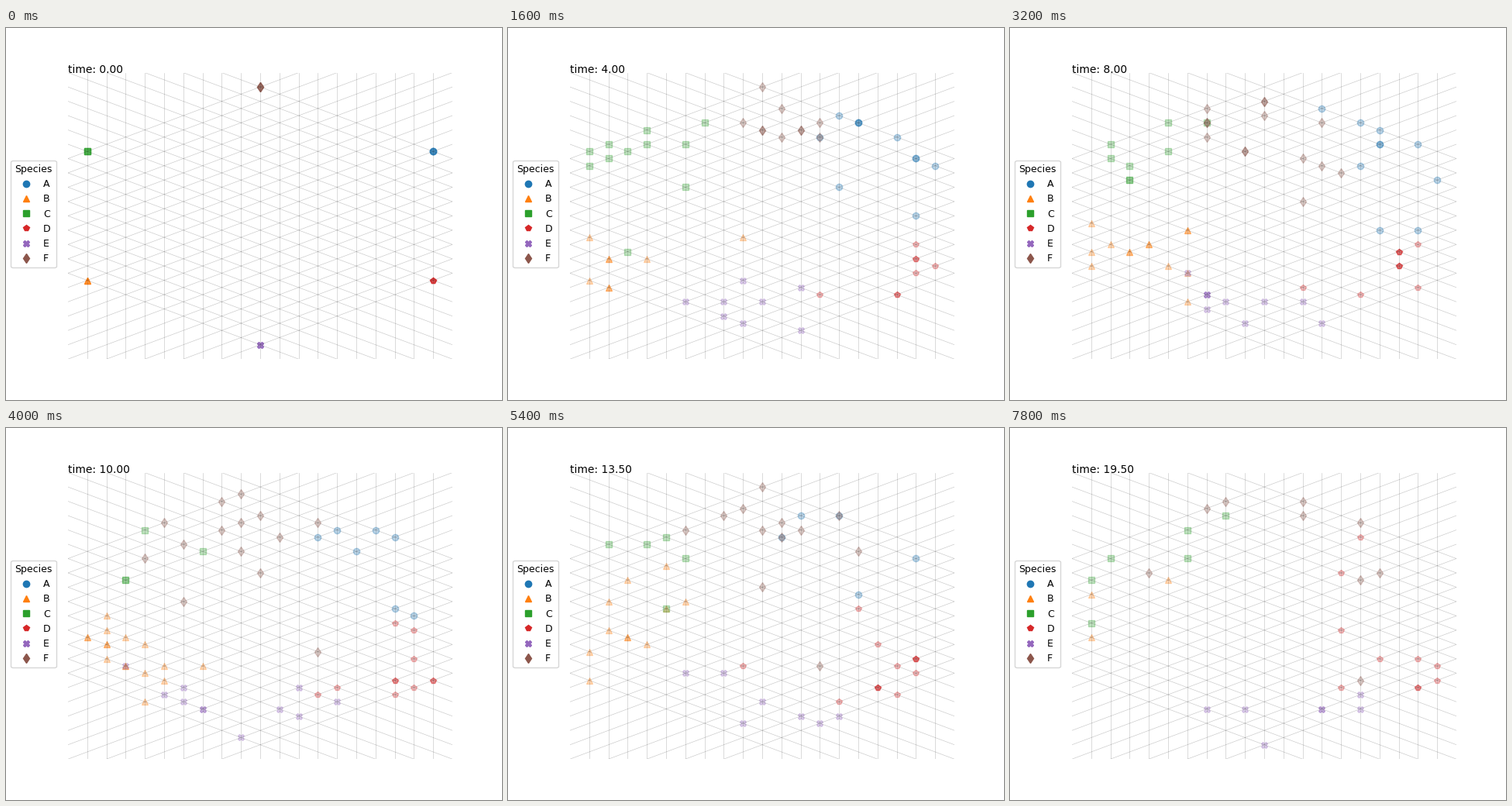
These frames come from a looping animation (640x480 px, 8 s). A matplotlib script:

```python
import numpy as np
import matplotlib.pyplot as plt
from matplotlib.animation import FuncAnimation
from matplotlib.lines import Line2D

FRAMES, INTERVAL = 40, 200
RADIUS = 9
HOPS = 1.5  # mean hops of one particle per frame
STEPS = np.array([(0, 1), (0, -1), (1, .5), (1, -.5), (-1, .5), (-1, -.5)])

MARKERS = dict(A="o", B="^", C="s", D="p", E="X", F="d")
COLORS = {name: f"C{k}" for k, name in enumerate(MARKERS)}

# Population and centre (x, y) of each species at the key frames
KEYS = [0, 5, 12, 20, 27, 33, 39]
CLOUDS = dict(
    A=[(5, 9, 4.5), (9, 6.9, 5.1), (14, 6.9, 5), (7, 4.9, 5),
       (5, 4.8, 5.4), (2, 5, 4.5), (0, 5, 4.5)],
    B=[(5, -9, -4.5), (6, -8, -4.3), (10, -6.7, -3.1), (16, -7, -2.5),
       (11, -7.1, -1), (7, -8, .3), (3, -8, 0)],
    C=[(5, -9, 4.5), (11, -7.1, 4.6), (11, -6.5, 3.9), (4, -5, 4.8),
       (5, -6, 3.6), (3, -6.3, 5.2), (6, -5.7, 5.3)],
    D=[(5, 9, -4.5), (7, 8.1, -3.8), (10, 6.6, -4.1), (11, 7, -4.5),
       (13, 6, -3.8), (8, 6.4, -3), (10, 6.4, -2)],
    E=[(5, 0, -9), (8, -1, -7.1), (9, -1.3, -7), (11, -2.2, -6.1),
       (7, -.3, -6.7), (7, .1, -7.1), (7, 1.4, -6.9)],
    F=[(5, 0, 9), (7, 1, 7.3), (14, .4, 6.7), (14, -1.3, 4.6),
       (12, 1, 5.6), (13, .8, 5.4), (9, .7, 4.4)],
)


def inside(p):
    return abs(p[0]) <= RADIUS and abs(p[1]) + abs(p[0]) / 2 <= RADIUS


def hop(site, pull, rng):
    """Move to a neighbouring site, favouring the direction of pull."""
    near = [site + s for s in STEPS if inside(site + s)]
    weight = np.exp([0.7 * np.dot(p - site, pull) for p in near])
    return near[rng.choice(len(near), p=weight / weight.sum())]


def walk(keys, rng):
    """Return the occupied sites of one species for every frame."""
    keys = np.array(keys)
    guide = np.array([np.interp(range(FRAMES), KEYS, col) for col in keys.T]).T
    sites = [keys[0, 1:].copy() for _ in range(int(keys[0, 0]))]
    history = [np.array(sites)]
    for count, *centre in guide[1:]:
        if sites:
            pull = np.clip(np.array(centre) - np.mean(sites, axis=0), -1.5, 1.5)
        for k in range(len(sites)):
            for _ in range(rng.poisson(HOPS)):
                sites[k] = hop(sites[k], pull, rng)
        while len(sites) > round(count):
            sites.pop(rng.integers(len(sites)))
        while len(sites) < round(count):
            sites.append(sites[rng.integers(len(sites))].copy())
        history.append(np.array(sites).reshape(-1, 2))
    return history


rng = np.random.default_rng(7)
paths = {name: walk(keys, rng) for name, keys in CLOUDS.items()}

fig, ax = plt.subplots(figsize=(6.4, 4.8), dpi=100)
edge = RADIUS + 1
ax.set(xlim=(-edge, edge), ylim=(-edge, edge))
ax.axis("off")

# Triangular lattice
grid = dict(color="k", lw=0.5, alpha=0.2, zorder=2)
for k in range(-RADIUS, RADIUS + 1):
    ax.plot([k, k], [-edge, edge], **grid)
    for slope in (-.5, .5):
        ax.plot([-edge, edge], [k - slope * edge, k + slope * edge], **grid)

dots = {
    name: ax.plot([], [], ls="", marker=mark, ms=6, color=COLORS[name],
                  alpha=0.3, zorder=1.5)[0]
    for name, mark in MARKERS.items()
}
clock = ax.text(0, 1, "", transform=ax.transAxes, fontsize=10)

handles = [Line2D([], [], ls="", marker=mark, ms=6, color=COLORS[name], label=name)
           for name, mark in MARKERS.items()]
fig.legend(handles=handles, title="Species", loc="center left",
           fontsize=9, title_fontsize=9)


def update(frame):
    for name, line in dots.items():
        line.set_data(*paths[name][frame].T)
    clock.set_text(f"time: {frame * 0.5:.2f}")
    return [*dots.values(), clock]


anim = FuncAnimation(fig, update, frames=FRAMES, interval=INTERVAL,
                     repeat=True, repeat_delay=0)
plt.show()
```
